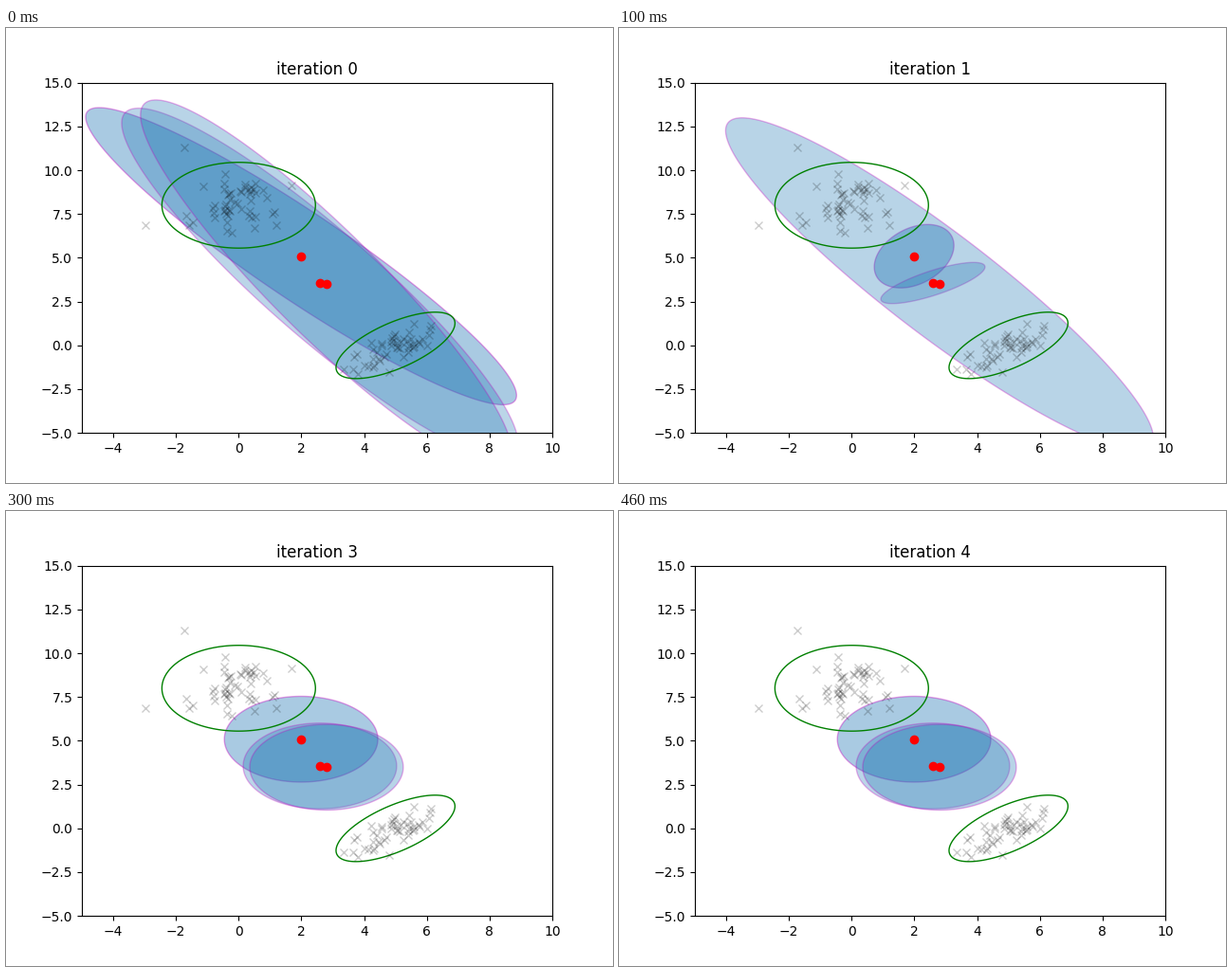
Write a matplotlib script that moves like this. It is 640x480 px and loops after 500 ms.

```python
import numpy as np
import matplotlib.pyplot as plt
from matplotlib.animation import FuncAnimation
from matplotlib.patches import Polygon

plt.rcParams["text.kerning_factor"] = 6  # whole-pixel kerning

R = np.sqrt(5.991)  # 95 % confidence radius
UNIT = (R, R, 0)
SIDE = R * np.sqrt(0.6)
STEPS = 5
MEANS = [(1.99, 5.09), (2.59, 3.56), (2.80, 3.49)]
WEIGHTS = [0.385, 0.300, 0.315]

# Half width, half height and correlation of each component
# until the fit settles on unit covariances
SHAPES = [
    [(6.87, 8.48, -0.937), (6.32, 9.98, -0.915), (5.93, 10.52, -0.918)],
    [(1.27, 1.81, 0.34), (1.66, 1.175, 0.78), (6.82, 9.50, -0.923)],
    [UNIT, (6.68, 10.26, -0.922), UNIT],
]


def ellipse(center, shape):
    """Outline of a confidence ellipse as an array of points."""
    hw, hh, rho = shape
    t = np.linspace(0, 2 * np.pi, 240, endpoint=False)
    x = hw * np.cos(t)
    y = hh * (rho * np.cos(t) + np.sqrt(1 - rho**2) * np.sin(t))
    return np.column_stack([x, y]) + center


def sample_points():
    """Two normal clusters and two outliers."""
    rng = np.random.RandomState(4)
    upper = rng.multivariate_normal((0, 8.1), [[0.6, 0.05], [0.05, 0.6]], 52)
    lower = rng.multivariate_normal((5, 0), [[0.45, 0.36], [0.36, 0.6]], 50)
    return np.vstack([upper, lower, [(-1.73, 11.3), (-2.97, 6.86)]])


fig, ax = plt.subplots(figsize=(6.4, 4.8), dpi=100)
ax.set_xlim(-5, 10)
ax.set_ylim(-5, 15)
title = ax.set_title("iteration 0")

blobs = []
for mean, weight, shape in zip(MEANS, WEIGHTS, SHAPES[0]):
    blob = Polygon(ellipse(mean, shape), facecolor="C0", edgecolor="m",
                   lw=1, alpha=weight)
    blobs.append(ax.add_patch(blob))

for center, shape in [((0, 8), UNIT), ((5, 0), (SIDE, SIDE, 2 / 3))]:
    ax.add_patch(Polygon(ellipse(center, shape), fill=False,
                         edgecolor="g", lw=1))

ax.plot(*sample_points().T, "kx", alpha=0.2)
ax.plot(*np.transpose(MEANS), "ro")


def update(i):
    title.set_text(f"iteration {i}")
    shapes = SHAPES[i] if i < len(SHAPES) else [UNIT] * 3
    for blob, mean, shape in zip(blobs, MEANS, shapes):
        blob.set_xy(ellipse(mean, shape))
    return [title, *blobs]


anim = FuncAnimation(fig, update, frames=STEPS, interval=100,
                     repeat=True, repeat_delay=0)
plt.show()
```
